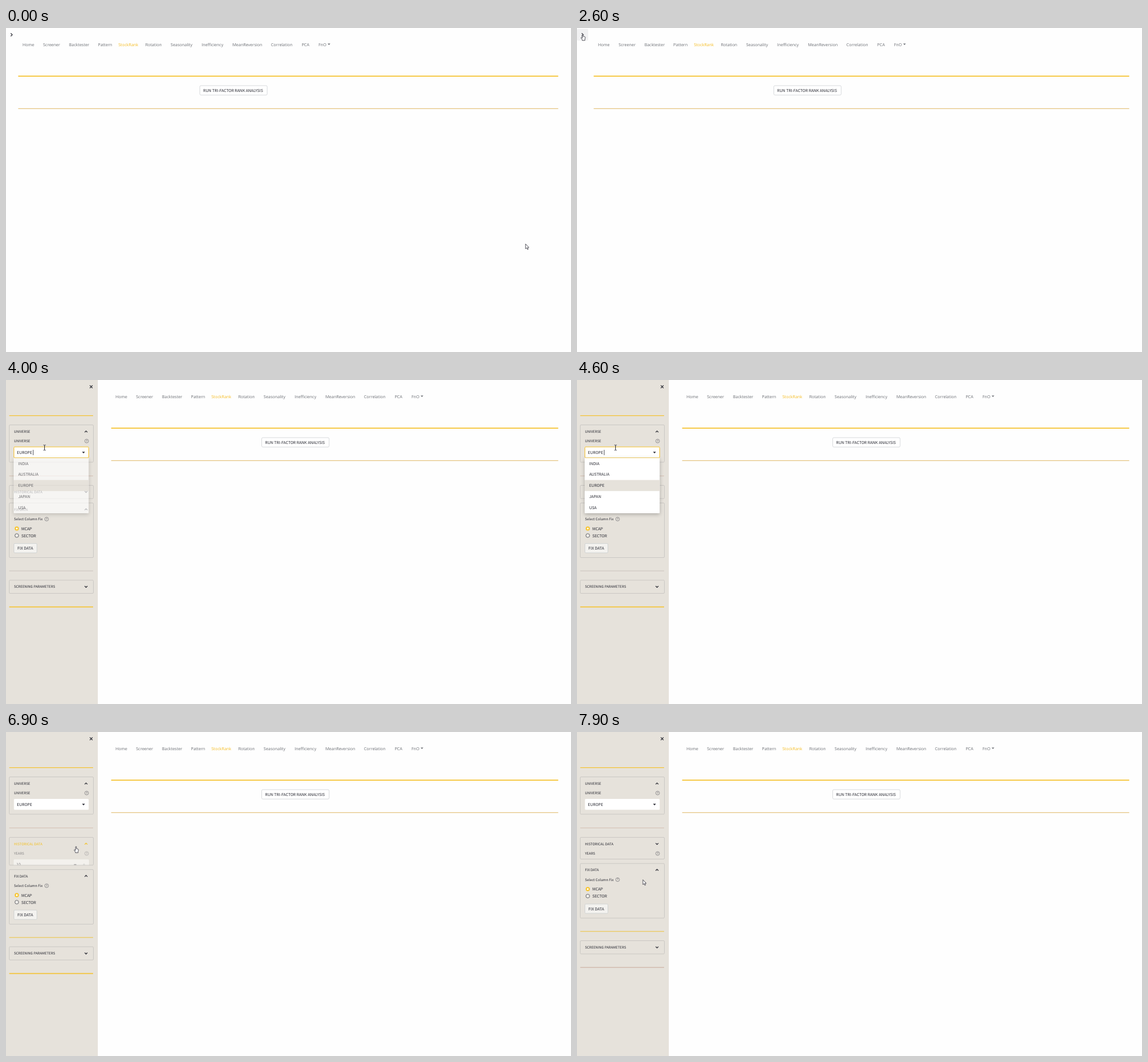
An HTML page that plays this animation: 960 px wide and 552 px high, repeating every 8000 ms.

```html
<!DOCTYPE html>
<html lang="en">
<head>
<meta charset="utf-8">
<title>Stock rank dashboard</title>
<style>
html, body { margin: 0; width: 100%; height: 100%; overflow: hidden; background: #fefefe; }
svg { display: block; width: 960px; height: 552px; }
text {
  font-family: "Noto Sans CJK JP", "Noto Sans CJK SC", "Noto Sans CJK", "Open Sans", sans-serif;
  font-size: 6.65px; fill: #262730; text-rendering: geometricPrecision; white-space: pre;
}
.nav text { font: 7px "Open Sans", "Noto Sans", sans-serif; fill: #6b6e74; }
.nav .on { fill: #f4bc22; }
.small { font-size: 5.87px; }
.help circle { fill: none; stroke: #5b5c62; stroke-width: .6; }
.help text { font-size: 5px; text-anchor: middle; fill: #45464d; }
.box { fill: none; stroke: #cbc8c4; }
.btn { fill: #f3f2ef; stroke: #d2d4d3; }
.icon { fill: none; stroke: #262730; stroke-width: 1.2; }
.hot text.title { fill: #f4c020; }
.hot .icon.title { stroke: #f4c020; }
#list { filter: drop-shadow(0 2px 3px rgba(0, 0, 0, .25)); }
#cursor path { fill: #fff; stroke: #30303a; stroke-width: .8; stroke-linejoin: round; }
#cursor .beam { fill: none; stroke-width: 1; }
</style>
</head>
<body>
<svg id="stage" viewBox="0 0 960 552"></svg>
<script>
const YELLOW = '#f5c230', PINK = '#d3bfb4', GREY = '#cdc5c0';
const EXPANDED = 104.3;

// Text is placed by the vertical centre of its capitals.
const label = (x, mid, s, cls = '') =>
  `<text x="${x}" y="${mid + (cls.includes('small') ? 2.15 : 2.45)}" class="${cls}">${s}</text>`;
const rect = (x, y, w, h, attrs = '') =>
  `<rect x="${x}" y="${y}" width="${w}" height="${h}" ${attrs}/>`;
const rule = (y, color, h = 1, id = '') => rect(5.5, y - h / 2, 142.5, h, `fill="${color}" id="${id}"`);
const box = (y, h, id = '') => rect(5.5, y, 143, h, `rx="1.5" class="box" id="${id}"`);
const btn = (x, y, w, h) => rect(x, y, w, h, 'rx="1.5" class="btn"');
const help = (x, y) =>
  `<g class="help"><circle cx="${x}" cy="${y}" r="3.2"/><text x="${x}" y="${y + 1.8}">?</text></g>`;
const chevron = (y, up, id = '') => {
  const d = up ? 1.2 : -1.2;
  return `<path id="${id}" class="icon title" d="M133.7 ${y + d}L136 ${y - d}L138.3 ${y + d}"/>`;
};
const stepper = (mid, value, plusAlpha) =>
  rect(13, mid - 9, 128, 18, 'rx="1.5" fill="#fff"') + label(17.5, mid, value) +
  `<path class="icon" d="M115.5 ${mid}h4"/>` +
  `<path class="icon" opacity="${plusAlpha}" d="M130.5 ${mid}h4m-2 -2v4"/>`;

const tabs = [['Home', 28], ['Screener', 63], ['Backtester', 107], ['Pattern', 156.2], ['StockRank', 191],
  ['Rotation', 236.8], ['Seasonality', 279.8], ['Inefficiency', 332.3], ['MeanReversion', 384.8],
  ['Correlation', 450.2], ['PCA', 502.4], ['FnO', 531]];
const countries = ['INDIA', 'AUSTRALIA', 'EUROPE', 'JAPAN', 'USA'];
const ROW = 18.8, LIST_TOP = 132.8;

const main = `
  <g id="opener">
    <rect id="openerHover" x="0" y="1.5" width="19" height="20" rx="2" fill="#f1f1f2"/>
    <path class="icon" d="M8 8.8L10.7 11.5L8 14.2"/>
  </g>
  <g class="nav" id="nav">
    ${tabs.map(([s, x]) => `<text x="${x}" y="30.5" class="${s === 'StockRank' ? 'on' : ''}">${s}</text>`).join('')}
    <path d="M546.5 26.6h4.6l-2.3 2.5z" fill="#6b6e74"/>
  </g>
  <rect id="topRule" y="81.2" height="1.7" fill="${YELLOW}"/>
  <rect id="lowRule" y="136.8" height="1" fill="#dfb866"/>
  <g id="run">
    ${rect(329.3, 98.2, 114.5, 16, 'rx="2" fill="#fff" stroke="#d8dadd"')}
    ${label(335, 106.2, 'RUN TRI-FACTOR RANK ANALYSIS')}
  </g>`;

const universe = `
  ${box(76.5, 63.5)}
  ${label(13.5, 88, 'UNIVERSE', 'small')}${chevron(88, true)}
  ${label(13.5, 104, 'UNIVERSE', 'small')}${help(137, 104)}
  <rect id="select" x="13.5" y="114" width="127" height="18.5" rx="1.5" fill="#fff"/>
  ${label(18.5, 123.3, 'EUROPE')}
  <path id="caret" d="M46.2 119v9" stroke="#262730" stroke-width=".8"/>
  <path d="M129.2 122.2h5l-2.5 2.7z" fill="#262730"/>`;

const history = `
  <clipPath id="clip"><rect id="clipRect" x="5" y="179" width="144"/></clipPath>
  ${box(179.5, 22.5, 'historyBox')}
  <g id="historyHead">
    ${label(13.5, 190.5, 'HISTORICAL DATA', 'small title')}
    ${chevron(190.5, true, 'chevUp')}${chevron(190.5, false, 'chevDown')}
  </g>
  <g clip-path="url(#clip)"><g id="historyBody">
    ${label(13.5, 207, 'YEARS', 'small')}${help(137, 207)}
    ${stepper(226, '10', .25)}
    ${label(13.5, 248.5, 'ASSETS', 'small')}${help(137, 248.5)}
    ${stepper(267.3, '600', 1)}
    ${btn(13.5, 284.5, 67, 16)}${label(19.3, 292.7, 'DOWNLOAD DATA')}
  </g></g>`;

const lower = `
  ${box(209.5, 93)}
  ${label(13.5, 220.5, 'FIX DATA', 'small')}${chevron(220.5, true)}
  ${label(13.5, 237, 'Select Column Fix', 'small')}${help(69, 237)}
  <circle cx="18.3" cy="253" r="2.6" fill="#fff" stroke="#f7c530" stroke-width="2"/>
  ${label(26, 253.2, 'MCAP')}
  <circle cx="18.3" cy="265" r="3.2" fill="#eeece8" stroke="#4a4b52" stroke-width=".8"/>
  ${label(26, 265.2, 'SECTOR')}
  ${btn(13.5, 278.5, 39, 16)}${label(19.3, 286.7, 'FIX DATA')}
  ${rule(325.2, GREY, 1.1, 'midRule')}
  ${box(341, 22.5)}
  ${label(13.5, 352.2, 'SCREENING PARAMETERS', 'small')}${chevron(352.2, false)}
  ${rule(386.6, YELLOW, 1.6, 'endRule')}`;

const list = `
  <g id="list">
    ${rect(13, LIST_TOP, 127.5, 94.2, 'rx="1" fill="#fff"')}
    <rect id="mark" x="13" width="127.5" height="${ROW}" fill="#e6e2db"/>
    ${countries.map((s, i) => label(20.7, LIST_TOP + ROW * (i + .5), s)).join('')}
  </g>`;

const cursor = `
  <g id="cursor">
    <path id="arrow" d="M0 0V8.3L1.9 6.6L3.2 9.5L4.6 8.9L3.3 6.1H5.7Z"/>
    <path id="hand" d="M-.8 .5Q0 -.6 .8 .5V3.8L3.6 4.6Q4.2 4.9 4.1 6L3.4 8.6V10.7H-1.1V9.3L-3.2 6.5Q-3.3 5.4 -2.2 5.6L-.8 6.8Z"/>
    <path id="beam" class="beam" d="M-1.9 -4.4H-.6L0 -3.9L.6 -4.4H1.9M0 -3.9V3.9M-1.9 4.4H-.6L0 3.9L.6 4.4H1.9"/>
  </g>`;

document.getElementById('stage').innerHTML = `${main}
  <g id="side">
    ${rect(0, 0, 156, 552, 'fill="#e6e2db"')}
    <path class="icon" d="M142.4 9.2l4.6 4.6m0 -4.6l-4.6 4.6"/>
    ${rule(60.7, YELLOW, 1.2)}
    ${universe}
    ${rule(163.4, PINK)}
    ${history}
    <g id="lower">${lower}</g>
    ${list}
  </g>${cursor}`;

const el = {};
document.querySelectorAll('[id]').forEach(n => { if (n.id) el[n.id] = n; });
const set = (id, attrs) => { for (const k in attrs) el[id].setAttribute(k, attrs[k]); };
const show = (id, on) => { el[id].style.display = on ? '' : 'none'; };
const shift = (id, x, y = 0) => set(id, { transform: `translate(${x} ${y})` });
const ramp = (t, start, length) => Math.min(1, Math.max(0, (t - start) / length));
const smooth = p => p * p * (3 - 2 * p);
const fall = p => Math.pow(1 - p, 2.15);

// Pointer path: time, x, y of the hot spot.
const path = [
  [0, 882.8, 367.9], [800, 882.8, 367.9], [1000, 800, 333], [1200, 500, 210], [1400, 220, 101],
  [1500, 169, 79.7], [1700, 131, 38.5], [2000, 40, 18], [2200, 10, 10.5], [2700, 10, 10.5],
  [3000, 40, 50], [3200, 54.7, 73], [3500, 63, 110.5], [3600, 65.5, 115.2], [4600, 65.5, 115.2],
  [4800, 69, 140], [5200, 88, 186], [5500, 112, 197], [5700, 136, 192], [5900, 147, 176.5],
  [6000, 152.5, 176.5], [6100, 152, 177], [6400, 119, 195], [7500, 119, 195], [7700, 118, 214], [7900, 112, 251.7]
];
function pointer(t) {
  const i = path.findIndex(k => k[0] > t);
  if (i < 0) return path[path.length - 1].slice(1);
  const [a, b] = [path[i - 1], path[i]];
  const p = (t - a[0]) / (b[0] - a[0]);
  return [a[1] + (b[1] - a[1]) * p, a[2] + (b[2] - a[2]) * p];
}
const within = (t, a, b) => t >= a && t < b;

function draw(t) {
  const [x, y] = pointer(t);

  // Side panel slides in and the page makes room
  const open = smooth(ramp(t, 2560, 300));
  const left = 20.7 + 158 * open;
  shift('nav', 158 * open);
  shift('run', 105.2 * open);
  set('topRule', { x: left, width: 938.3 - left });
  set('lowRule', { x: left, width: 938.3 - left });
  shift('side', -156 * (1 - smooth(ramp(t, 2600, 260))));
  show('side', t > 2600);
  show('opener', t < 2700);
  show('openerHover', within(t, 2200, 2700));

  // Country select
  const focus = within(t, 3900, 6100);
  set('select', { stroke: focus ? YELLOW : 'none' });
  show('caret', focus && (t < 4100 || (t - 4100) % 1060 < 530));
  const alpha = ramp(t, 3800, 300) * (1 - ramp(t, 5900, 200));
  show('list', alpha > 0);
  el.list.style.opacity = alpha;
  const hovered = Math.floor((y - LIST_TOP) / ROW);
  const row = t < 4700 ? 2 : t < 5700 ? Math.max(0, hovered) : 3;
  set('mark', { y: LIST_TOP + ROW * row });

  // Historical data expander
  const s = EXPANDED * (t < 7600 ? 1 - fall(ramp(t, 6850, 420)) : fall(ramp(t, 7600, 500)));
  set('historyBox', { height: 22.5 + s });
  set('clipRect', { height: 22.5 + s });
  show('historyBody', s > 0);
  el.historyBody.style.opacity = .5 + .5 * ramp(t, 7300, 300);
  el.historyHead.classList.toggle('hot', within(t, 6300, 7700));
  const expanded = within(t, 6900, 7600);
  show('chevUp', expanded);
  show('chevDown', !expanded);
  shift('lower', 0, s);
  set('midRule', { fill: s > 0 ? '#edc64c' : GREY });
  set('endRule', { fill: t >= 7800 ? PINK : YELLOW });

  // Pointer shape
  const beam = within(t, 3600, 4700);
  const hand = within(t, 2200, 2700) || within(t, 4700, 5800) || within(t, 6300, 7700);
  show('beam', beam);
  show('hand', hand);
  show('arrow', !beam && !hand);
  shift('cursor', x, y);
}

const start = performance.now();
function tick(now) {
  const t = Math.max(0, now - start) % 8000;
  draw(Math.floor(t / 100) * 100);
  requestAnimationFrame(tick);
}
draw(0);
requestAnimationFrame(tick);
</script>
</body>
</html>
```
